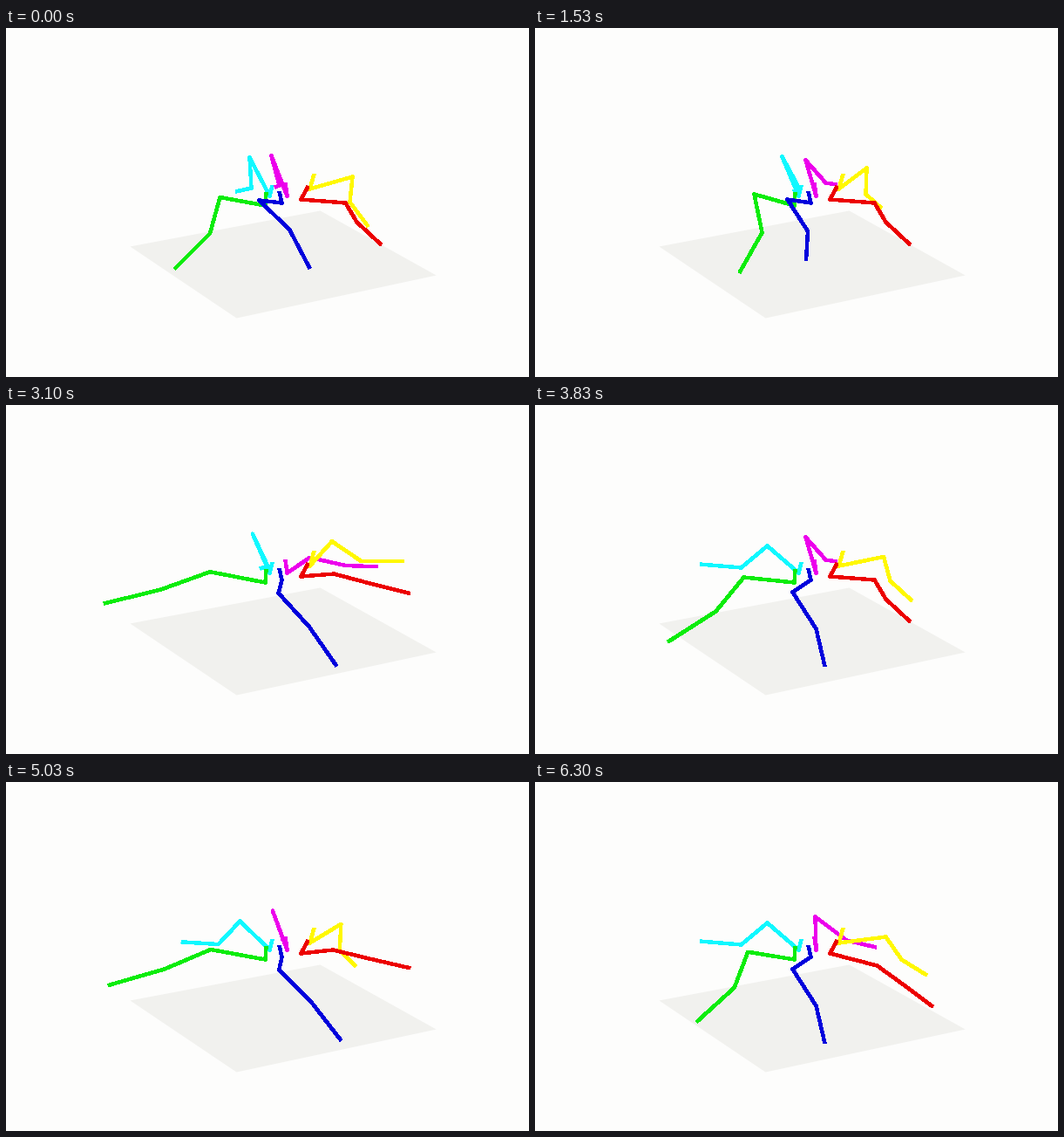
A matplotlib script for the animation above (6.33 s loop, 600 px wide and 400 px high).

```python
import numpy as np
import matplotlib.pyplot as plt
from matplotlib.animation import FuncAnimation
from matplotlib.patches import Polygon

W, H, DPI = 600, 400, 100
STEP, LOOP = 30, 6330
BEATS = np.array([0, 1530, 2430, 3810, 4530, 5550, 6300])
SWING = 700     # rough length of one out-and-back swing, ms
WARM_UP = 2000  # swings widen until this time, ms

fig = plt.figure(figsize=(W / DPI, H / DPI), dpi=DPI, facecolor="#fdfdfc")
ax = fig.add_axes([0, 0, 1, 1])
ax.set_xlim(-0.5, W - 0.5)
ax.set_ylim(H - 0.5, -0.5)
ax.axis("off")
ax.add_patch(Polygon([(142, 250), (360, 209), (493, 283), (264, 332)],
                     facecolor="#f1f1ee", edgecolor="none"))


class Leg:
    """One stroke value slides knee, ankle and foot along a chain of poses."""

    def __init__(self, color, hip, strokes, *poses):
        self.hip = np.reshape(hip, (2, 2))
        self.strokes = strokes
        self.poses = np.array(poses, float)
        self.end = len(poses) - 1
        self.line, = ax.plot([], [], color=color, lw=3.4 * 72 / DPI,
                             solid_capstyle="butt", solid_joinstyle="round",
                             antialiased=False)

    def stroke(self, t):
        """Ease from beat to beat, swinging to the far end and back between."""
        n = min(np.searchsorted(BEATS, t, side="right"), len(BEATS) - 1) - 1
        gap = BEATS[n + 1] - BEATS[n]
        u = (t - BEATS[n]) / gap
        a, b = self.strokes[n], self.strokes[n + 1]
        base = a + (b - a) * (1 - np.cos(np.pi * u)) / 2
        far = self.end if a + b <= self.end else 0
        swings = max(1, gap // SWING)
        reach = 0.9 * min(1, t / WARM_UP) * np.sin(np.pi * swings * u) ** 2
        return base + (far - base) * reach

    def move(self, t):
        s = self.stroke(t)
        marks = range(self.end + 1)
        joints = [np.interp(s, marks, column) for column in self.poses.T]
        self.line.set_data(*np.vstack([self.hip, np.reshape(joints, (3, 2))]).T)


# Far side first; poses run from tucked in to fully stretched.
legs = [
    Leg("#10f8ff", (305, 180, 302, 192), (1, 0, 1, 2, 1, 0, 2),
        (283, 147, 303, 184, 296, 187),
        (279, 148, 281, 183, 263, 187),
        (266, 161, 236, 186, 189, 182)),
    Leg("#ec00ec", (320, 177, 322, 192), (0, 1, 2, 1, 3, 1, 2),
        (304, 146, 313, 180, 308, 182),
        (310, 151, 333, 177, 346, 179),
        (321, 154, 357, 181, 391, 189),
        (353, 178, 395, 184, 432, 184)),
    Leg("#fff800", (353, 167, 348, 184), (1, 0, 1, 1.5, 3, 1, 2),
        (380, 160, 379, 190, 397, 206),
        (397, 170, 394, 199, 415, 227),
        (402, 177, 420, 203, 449, 221),
        (367, 151, 404, 173, 457, 169)),
    Leg("#0cec0c", (298, 188, 297, 203), (0.5, 0, 1, 1, 0, 0, 0.6),
        (251, 190, 260, 234, 234, 280),
        (239, 197, 207, 236, 152, 271),
        (233, 190, 174, 208, 107, 222)),
    Leg("#ec0000", (346, 181, 338, 196), (0, 0, 1, 0, 2, 0, 1),
        (389, 200, 402, 222, 430, 248),
        (392, 210, 421, 231, 456, 257),
        (373, 190, 412, 198, 464, 208)),
    Leg("#0000dc", (313, 187, 316, 200), (1, 0.5, 1, 2, 4, 0, 2),
        (288, 195, 300, 234, 273, 257),
        (290, 197, 325, 231, 348, 275),
        (295, 214, 322, 256, 332, 299),
        (304, 218, 318, 270, 322, 328),
        (315, 214, 358, 248, 399, 288)),
]


def draw(i):
    for leg in legs:
        leg.move(i * STEP)
    return [leg.line for leg in legs]


anim = FuncAnimation(fig, draw, frames=LOOP // STEP, interval=STEP,
                     repeat=True, repeat_delay=0, blit=False)
plt.show()
```
